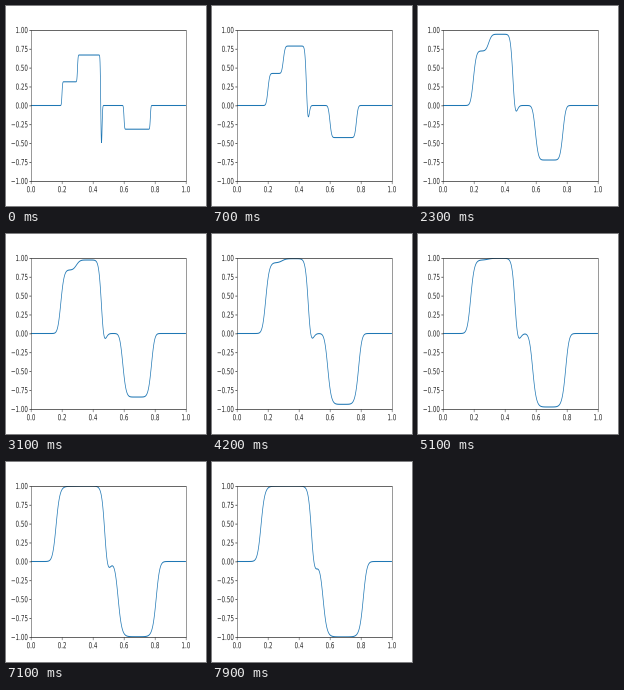
These frames come from a looping animation (200 px wide and 200 px high, 8000 ms). A matplotlib script:

```python
import numpy as np
import matplotlib.pyplot as plt
from matplotlib.animation import FuncAnimation
from matplotlib.patches import PathPatch, Polygon, Rectangle
from matplotlib.textpath import TextPath
from matplotlib.transforms import Affine2D

FRAMES, STEP_MS = 80, 100
W, H = 432, 288                      # layout units, mapped onto a square stage
L, R, B, T = 54, 388.8, 36, 253.44   # plot area
FONT = 12
INK = "#262626"

# Reaction-diffusion u_t = D u_xx + K (u - u^3), time measured in frames
D, K, SUB = 5e-6, 0.05, 20
N = 1000
x = (np.arange(N) + 0.5) / N


def solve():
    u = np.zeros(N)
    for a, b, level in [(0.2, 0.3, 0.3), (0.3, 0.45, 0.65),
                        (0.45, 0.458, -0.67), (0.6, 0.77, -0.3)]:
        u[(x > a) & (x < b)] = level
    dt, r = 1 / SUB, D / SUB * N ** 2
    states = []
    for _ in range(FRAMES):
        for _ in range(SUB):
            lap = np.zeros(N)
            lap[1:-1] = u[2:] - 2 * u[1:-1] + u[:-2]
            u = u + r * lap + dt * K * (u - u ** 3)
        states.append(u)
    return states


def to_x(v):
    return L + v * (R - L)


def to_y(v):
    return B + (v + 1) / 2 * (T - B)


def ribbon(u, width=1.5):
    """Outline of the curve stroked with an even width in layout units."""
    px, py = to_x(x), to_y(u)
    dx, dy = np.gradient(px), np.gradient(py)
    k = width / 2 / np.hypot(dx, dy)
    nx, ny = -dy * k, dx * k
    upper = np.column_stack([px + nx, py + ny])
    lower = np.column_stack([px - nx, py - ny])
    return np.vstack([upper, lower[::-1]])


fig = plt.figure(figsize=(2, 2), dpi=100, facecolor="white")
ax = fig.add_axes([0, 0, 1, 1])
ax.set_xlim(0, W)
ax.set_ylim(0, H)
ax.axis("off")


def bar(x0, y0, w, h):
    ax.add_patch(Rectangle((x0, y0), w, h, fc=INK, lw=0, snap=False, zorder=3))


def hline(x0, x1, y, w=1.0):
    bar(x0, y - w / 2, x1 - x0, w)


def vline(x0, y0, y1, w=1.0):
    bar(x0 - w / 2, y0, w, y1 - y0)


def label(text, px, py, align):
    path = TextPath((0, 0), text, size=FONT)
    box = path.get_extents()
    if align == "right":
        shift = px - box.x1, py - box.height / 2 - box.y0
    else:
        shift = px - (box.x0 + box.x1) / 2, py - box.y1
    path = path.transformed(Affine2D().translate(*shift))
    ax.add_patch(PathPatch(path, fc=INK, lw=0, snap=False, zorder=3))


left, right, bottom, top = 54.5, 389.5, 35.5, 252.5
for y in (bottom, top):
    hline(left - 0.5, right + 0.5, y)
for v in (left, right):
    vline(v, bottom, top)

for v in np.linspace(0, 1, 6):
    vline(to_x(v) + 0.3, bottom - 4, bottom)
    label(f"{v:.1f}", to_x(v), B - 7.3, "center")
for v in np.linspace(-1, 1, 9):
    hline(left - 4, left, to_y(v) - 0.5)
    label(f"{v:.2f}".replace("-", "\u2212"), L - 7.5, to_y(v), "right")

states = solve()
curve = Polygon(ribbon(states[0]), closed=True, fc="#1f77b4", lw=0,
                snap=False, zorder=2)
ax.add_patch(curve)
curve.set_clip_path(Rectangle((L, B), R - L, T - B, transform=ax.transData))


def update(i):
    curve.set_xy(ribbon(states[i]))
    return (curve,)


anim = FuncAnimation(fig, update, frames=FRAMES, interval=STEP_MS,
                     repeat=True, repeat_delay=0, blit=False)
plt.show()
```
